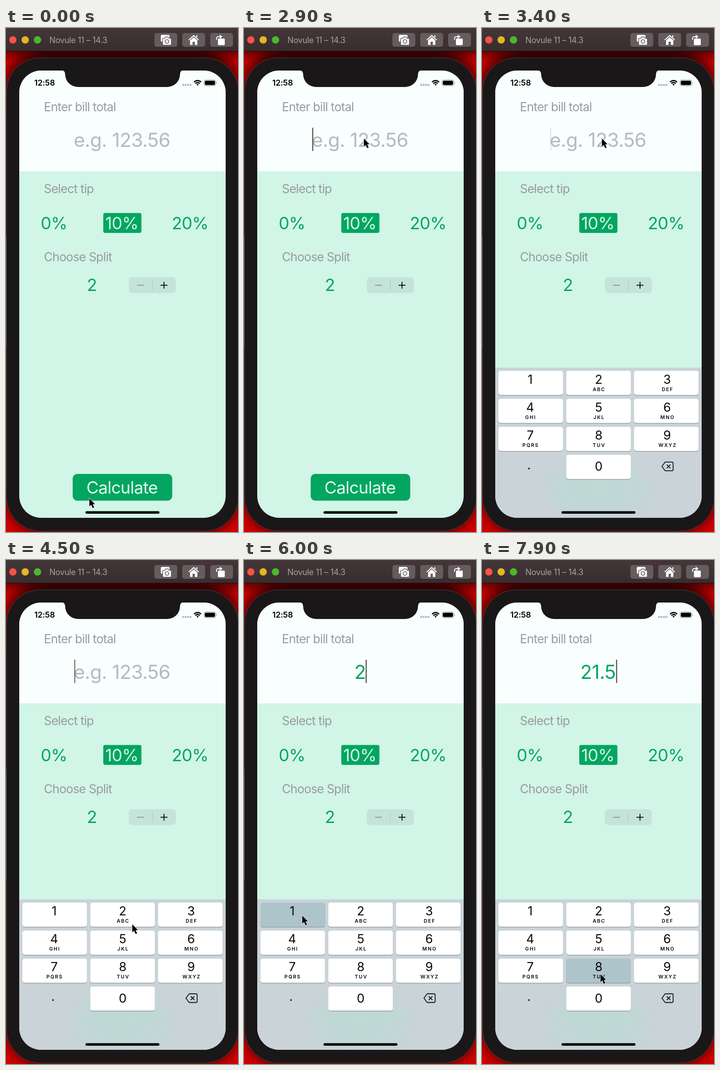
These frames come from a looping animation (508 by 1102 pixels, 8 s). An HTML page:

```html
<!DOCTYPE html>
<html lang="en">
<head>
<meta charset="utf-8">
<title>Tip calculator</title>
<style>
  html, body { margin: 0; width: 100%; height: 100%; overflow: hidden; background: #1a1719; }
  svg { display: block; width: 100%; height: 100%; }
  text { font-family: Inter, Roboto, sans-serif; white-space: pre; }
  .label { font-size: 26.5px; fill: #999b9c; letter-spacing: -.03em; }
  .big { font-size: 37px; fill: #02a660; text-anchor: middle; letter-spacing: -.02em; }
  .input { font-size: 42.3px; text-anchor: middle; letter-spacing: -.014em; }
  .digit { font-size: 27px; text-anchor: middle; fill: #0a0a0b; }
  .letters { font-size: 10.8px; font-weight: 600; text-anchor: middle; fill: #0a0a0b; letter-spacing: .16em; }
</style>
</head>
<body>
<svg viewBox="0 0 508 1102" preserveAspectRatio="none">
  <defs>
    <linearGradient id="bar" x2="0" y2="1">
      <stop stop-color="#43373a"/><stop offset="1" stop-color="#372c2e"/>
    </linearGradient>
    <linearGradient id="shade" x2="0" y2="1">
      <stop stop-color="#100" stop-opacity=".5"/><stop offset="1" stop-color="#100" stop-opacity="0"/>
    </linearGradient>
    <radialGradient id="glow">
      <stop stop-color="#bed9d4"/><stop offset=".6" stop-color="#c0d8d5" stop-opacity=".85"/>
      <stop offset="1" stop-color="#c9d3d8" stop-opacity="0"/>
    </radialGradient>
    <filter id="blur" x="-20%" y="-20%" width="140%" height="140%"><feGaussianBlur stdDeviation="16"/></filter>
    <clipPath id="screen"><rect x="29" y="93" width="452" height="978" rx="48"/></clipPath>
    <clipPath id="panel"><rect id="panelBox" x="29" y="742" width="452" height="400"/></clipPath>
  </defs>

  <!-- desktop and window bar -->
  <rect width="508" height="1102" fill="#d60000"/>
  <rect x="1" y="45" width="508" height="1060" rx="90" fill="#0c0000" opacity=".9" filter="url(#blur)"/>
  <rect y="50" width="508" height="24" fill="url(#shade)"/>
  <path d="M.5 195V455" stroke="#2b0a0a"/>
  <path d="M.5 457V700" stroke="#858283"/>
  <path d="M.5 700V1010" stroke="#681014"/>
  <rect width="508" height="50.5" fill="url(#bar)"/>
  <path d="M0 50.5H508" stroke="#171112"/>
  <circle cx="15" cy="26" r="8" fill="#fe5049"/>
  <circle cx="42" cy="26" r="8" fill="#e4b622"/>
  <circle cx="69" cy="26" r="8" fill="#4bb92a"/>
  <text x="95" y="32.5" font-size="18" fill="#a69fa1" style="letter-spacing:-.02em">Novule 11 – 14.3</text>
  <g fill="#665c5e">
    <rect x="325" y="11" width="50" height="30" rx="5"/>
    <rect x="386" y="11" width="50" height="30" rx="5"/>
    <rect x="447" y="11" width="50" height="30" rx="5"/>
  </g>
  <g fill="#fff">
    <rect x="339" y="15" width="19" height="15" rx="2.5"/>
    <path d="M345 22.5h3l2-3h5l2 3h3q2 0 2 2v11q0 2-2 2h-15q-2 0-2-2v-11q0-2 2-2z" stroke="#665c5e" stroke-width="1.5"/>
    <circle cx="352.5" cy="29.5" r="4" fill="none" stroke="#665c5e" stroke-width="1.7"/>
    <path d="M411 15L422.5 25.5l-1.5 1.6L411 18l-10 9.1-1.5-1.6z"/>
    <path d="M411 20l8 7.3V37h-5.5v-7h-5v7H403v-9.7zM416.5 16h2.5v5l-2.5-2.3z"/>
    <rect x="464" y="23" width="15" height="14.5" rx="2"/>
    <path d="M461 26v-3q0-4 4-4h4" fill="none" stroke="#fff" stroke-width="1.8"/>
    <path d="M468 14.5l6 4.5-6 4.5z"/>
  </g>

  <!-- phone -->
  <rect x="1" y="65" width="508" height="1035" rx="75" fill="#1a1719" stroke="#4b4143"/>
  <g clip-path="url(#screen)">
    <rect x="29" y="93" width="452" height="978" fill="#d1f5e7"/>
    <rect x="29" y="93" width="452" height="220.5" fill="#f8fffe"/>
    <text class="label" x="83" y="182">Enter bill total</text>
    <text class="label" x="83" y="361">Select tip</text>
    <text class="label" x="83" y="510">Choose Split</text>
    <text class="input" id="entry" x="254" y="259.5"></text>
    <path id="caret" d="M0 218V269" stroke="#4d4446" stroke-width="2.2"/>

    <rect x="213" y="404.5" width="83.5" height="43.5" rx="4" fill="#02a660"/>
    <text class="big" x="105" y="440">0%</text>
    <text class="big" x="253.5" y="440" style="fill:#d1f5e7">10%</text>
    <text class="big" x="403" y="440">20%</text>
    <text class="big" x="188" y="575">2</text>
    <rect x="269" y="545" width="103" height="34.5" rx="8" fill="#c4e4d9"/>
    <path d="M320.5 552V573" stroke="#a9c6bc"/>
    <path d="M287 562.5H302" stroke="#7e918b" stroke-width="1.7"/>
    <path d="M338.5 562.5H353.5M346 555V570" stroke="#0b0d0c" stroke-width="1.9"/>

    <rect x="146" y="975" width="218" height="58.5" rx="10" fill="#02a660"/>
    <text class="big" x="254" y="1018" style="fill:#e0f9ef">Calculate</text>

    <g clip-path="url(#panel)">
      <rect x="29" y="742" width="452" height="329" fill="#c9d3d8"/>
      <ellipse cx="254" cy="1008" rx="150" ry="82" fill="url(#glow)"/>
    </g>
    <g id="keys"></g>

    <text x="62" y="126" font-size="17.5" font-weight="600" style="letter-spacing:-.01em">12:58</text>
    <path d="M386 124.5h20" stroke="#b3b8b7" stroke-width="4" stroke-dasharray="4 1.3"/>
    <g fill="none" stroke="#000" stroke-width="2.6">
      <path d="M411.7 118.3Q419.5 111.3 427.3 118.3M414.6 121.3Q419.5 117 424.4 121.3"/>
      <path d="M417 123.4Q419.5 121.3 422 123.4L419.5 126z" fill="#000" stroke="none"/>
    </g>
    <rect x="433.5" y="113.5" width="26" height="13" rx="4" fill="none" stroke="#8b8f8e"/>
    <rect x="435.3" y="115.3" width="22.4" height="9.4" rx="2.4"/>
    <path d="M461 117.8q2 2.2 0 4.4z" fill="#8b8f8e"/>
    <rect x="174" y="1056.5" width="162" height="5.5" rx="2.75"/>
  </g>
  <path d="M121 92Q129.500 93 129.500 101A28 28 0 0 0 157.500 129H353A28 28 0 0 0 381 101Q381 93 389 92z" fill="#1a1719"/>

  <path id="pointer" d="M.5.5V18.200l4-3.800 3.200 7.300 3.300-1.400-3.200-7.100H13z" fill="#000" stroke="#fff" stroke-width="1.5" paint-order="stroke"/>
</svg>
<script>
const LOOP = 8000;
const $ = id => document.getElementById(id);
const entry = $('entry'), caret = $('caret'), keys = $('keys'), pointer = $('pointer'), panelBox = $('panelBox');

// Keypad
const LETTERS = ['', 'ABC', 'DEF', 'GHI', 'JKL', 'MNO', 'PQRS', 'TUV', 'WXYZ'];
const keyAt = (col, row, label, sub) => {
  const x = 36 + col * 148.4, y = 749 + row * 61.2, cx = 105.6 + col * 149.9;
  return `<rect x="${x}" y="${y + 1.3}" width="141.5" height="53" rx="5" fill="#8b9497"/>
    <rect id="key${label}" x="${x}" y="${y}" width="141.5" height="53" rx="5" fill="#fff"/>
    <text class="digit" x="${cx}" y="${y + (label === 0 ? 35 : 28)}">${label}</text>
    <text class="letters" x="${cx + 1}" y="${y + 44}">${sub}</text>`;
};
keys.innerHTML = LETTERS.map((sub, i) => keyAt(i % 3, i / 3 | 0, i + 1, sub)).join('') + keyAt(1, 3, 0, '') +
  `<text class="digit" x="103" y="964">.</text>
   <path d="M401 948.500H416q2.500 0 2.500 2.500v14q0 2.500-2.500 2.500H401L394 958z" fill="none" stroke="#111" stroke-width="1.8" stroke-linejoin="round"/>
   <path d="M404.500 954l8 8m0-8l-8 8" stroke="#111" stroke-width="1.8"/>`;

// [time, x, y]
const PATH = [
  [0, 182, 1028], [600, 182, 1028], [1500, 262, 241], [3600, 262, 241], [4400, 276, 796],
  [5200, 276, 796], [5800, 127, 777], [6200, 127, 777], [6700, 104, 950], [7000, 104, 950],
  [7350, 268, 838], [7600, 268, 838], [7850, 259, 905], [LOOP, 259, 905]
];
// [key, down, up]
const PRESSES = [[2, 4700, 4850], [1, 5950, 6100], [5, 7450, 7600], [8, 7850, LOOP]];
// [time, text, caret x]
const ENTRIES = [
  [0, '', -9], [1600, '', 150.5], [4850, '2', 267.5], [6100, '21', 276.5], [7000, '21.', 282], [7600, '21.5', 294.7]
];
const SLIDE = { start: 2955, length: 500, height: 335 };

const clamp = v => Math.min(1, Math.max(0, v));
const ease = u => u * u * (3 - 2 * u);

// Fast-out curve, solved by bisection
function slideEase(u) {
  const bez = (s, a, b) => 3 * a * s * (1 - s) ** 2 + 3 * b * s * s * (1 - s) + s ** 3;
  let lo = 0, hi = 1;
  for (let i = 0; i < 20; i++) {
    const s = (lo + hi) / 2;
    if (bez(s, .38, .125) < u) lo = s; else hi = s;
  }
  return bez(lo, .7, 1);
}

function pointerAt(t) {
  const i = PATH.findIndex(p => p[0] > t);
  const [t0, x0, y0] = PATH[i - 1], [t1, x1, y1] = PATH[i];
  const u = ease((t - t0) / (t1 - t0));
  return [x0 + (x1 - x0) * u, y0 + (y1 - y0) * u];
}

function blink(age) {
  const p = age % 1000;
  return p < 780 ? 1 - clamp((p - 480) / 150) : clamp((p - 780) / 150);
}

function draw(t) {
  const [x, y] = pointerAt(t);
  pointer.setAttribute('transform', `translate(${x} ${y})`);

  const [since, text, caretX] = ENTRIES.filter(e => e[0] <= t).pop();
  entry.textContent = text || 'e.g. 123.56';
  entry.setAttribute('fill', text ? '#02a660' : '#b7babb');
  caret.setAttribute('transform', `translate(${caretX} 0)`);
  caret.setAttribute('opacity', blink(t - since));

  const shift = SLIDE.height * (1 - slideEase(clamp((t - SLIDE.start) / SLIDE.length)));
  keys.setAttribute('transform', `translate(0 ${shift})`);
  panelBox.setAttribute('y', 742 + shift);

  for (const [key, down, up] of PRESSES)
    $('key' + key).setAttribute('fill', t >= down && t < up ? '#adc4ca' : '#fff');
}

const begin = performance.now();
function tick() {
  draw((performance.now() - begin) % LOOP);
  requestAnimationFrame(tick);
}
tick();
</script>
</body>
</html>
```
